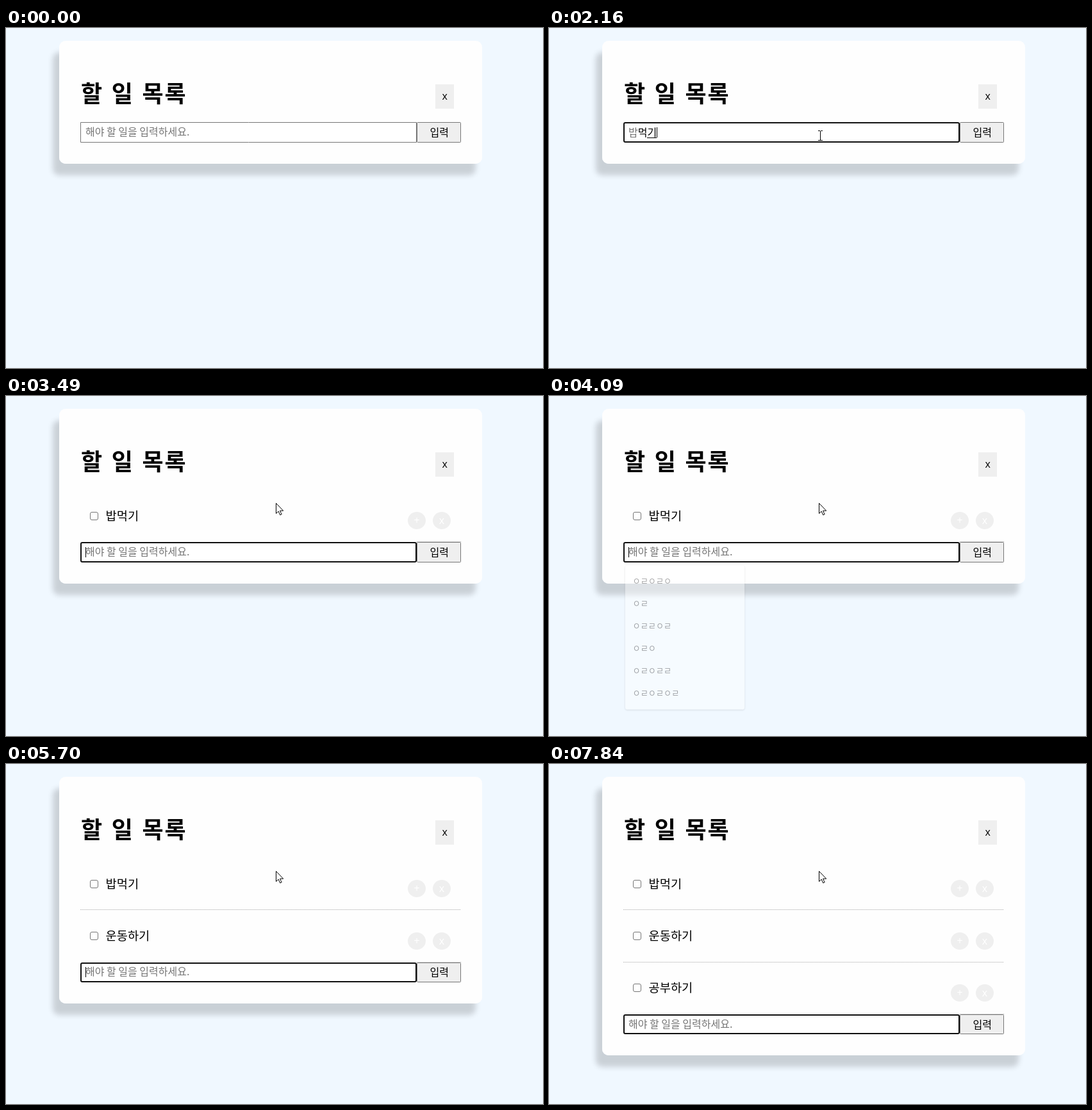
An HTML page with a canvas for the animation above (8 s loop, 838 by 531 pixels).

```html
<!DOCTYPE html>
<html lang="ko">
<head>
<meta charset="utf-8">
<title>할 일 목록</title>
<style>
  html, body { margin: 0; width: 100%; height: 100%; overflow: hidden; background: #f0f8ff; }
  canvas { display: block; }
</style>
</head>
<body>
<canvas id="stage" width="838" height="531" lang="ko"></canvas>
<script>
const ctx = document.getElementById('stage').getContext('2d');
const LOOP = 8000, TICK = 70;
const KO = '"Noto Sans CJK KR", "Noto Sans CJK JP", "Noto Sans CJK", sans-serif';
const LATIN = '"Open Sans", "Noto Sans", sans-serif';
const BODY = `300 16px ${KO}`;
const PLACEHOLDER = '해야 할 일을 입력하세요.';

// Layout by number of finished items
const LAYOUT = [
  { top: 147, h: 32, caret: 155 },
  { top: 228, h: 32, caret: 236 },
  { top: 310, h: 31, caret: 317 },
  { top: 391, h: 31, caret: 399 }
];
const ITEMS = [
  { at: 2420, text: '밥먹기', y: 181, dots: 194.5 },
  { at: 5700, text: '운동하기', y: 262, dots: 276.5 },
  { at: 7290, text: '공부하기', y: 343, dots: 357.5 }
];

// What the field holds from each moment on
const TYPING = [
  [0, ''],
  [1360, 'ㅂ'], [1500, '바'], [1570, '밥'], [1700, '밥ㅁ'], [1830, '밥머'],
  [1960, '밥먹'], [2090, '밥먹ㄱ'], [2160, '밥먹기'], [2420, ''],
  [2950, 'ㅇ'], [3280, ''], [3620, 'ㅇ'], [3950, ''],
  [4420, 'ㅇ'], [4490, '우'], [4630, '운'], [4770, '운ㄷ'], [4840, '운도'],
  [4960, '운동'], [5090, '운동ㅎ'], [5160, '운동하'], [5230, '운동학'],
  [5430, '운동하기'], [5700, ''],
  [5960, 'ㄱ'], [6060, '고'], [6170, '공'], [6270, '공ㅂ'], [6370, '공부'],
  [6480, '공붛'], [6600, '공부하'], [6690, '공부학'], [6820, '공부하기'], [7290, '']
];

const RECENT = ['dfdf', 'ㅇㄹㅇㄹㅇ', 'ㅀㅀ', 'cvvv', 'ㅇㄹ', '496181'];
const MATCHES = ['ㅇㄹㅇㄹㅇ', 'ㅇㄹ', 'ㅇㄹㄹㅇㄹ', 'ㅇㄹㅇ', 'ㅇㄹㅇㄹㄹ', 'ㅇㄹㅇㄹㅇㄹ'];
const POPUPS = [
  { open: 690, close: 1360, list: RECENT },
  { open: 2950, close: 3280, list: MATCHES },
  { open: 3620, close: 3950, list: MATCHES },
  { open: 4420, close: 4490, list: MATCHES }
];

const FOCUS_AT = 550;
const CARET_OFF = [[0, FOCUS_AT], [1150, 1360], [7840, LOOP]];

function text(str, x, y, font, color = '#000') {
  ctx.font = font;
  ctx.fillStyle = color;
  ctx.fillText(str, x, y);
}

function rounded(x, y, w, h, r) {
  ctx.beginPath();
  ctx.roundRect(x, y, w, h, r);
}

function outline(x, y, w, h, r, color, width = 1) {
  rounded(x + width / 2, y + width / 2, w - width, h - width, r);
  ctx.strokeStyle = color;
  ctx.lineWidth = width;
  ctx.stroke();
}

// A box whose shadow stays outside it, so that it can be translucent
function panel(x, y, w, h, r, fill, [color, dx, dy, blur]) {
  ctx.save();
  ctx.beginPath();
  ctx.rect(0, 0, 838, 531);
  ctx.roundRect(x, y, w, h, r);
  ctx.clip('evenodd');
  ctx.shadowColor = color;
  ctx.shadowOffsetX = dx;
  ctx.shadowOffsetY = dy;
  ctx.shadowBlur = blur;
  rounded(x, y, w, h, r);
  ctx.fillStyle = fill;
  ctx.fill();
  ctx.restore();
  rounded(x, y, w, h, r);
  ctx.fillStyle = fill;
  ctx.fill();
}

function drawCard(bottom) {
  panel(83, 20, 660, bottom - 20, 10, '#fefefe', ['rgba(0,0,0,.16)', -10, 18, 8]);

  ctx.letterSpacing = '2px';
  ctx.wordSpacing = '2.4px';
  text('할 일 목록', 117, 115.5, `700 36px ${KO}`);
  ctx.letterSpacing = ctx.wordSpacing = '0px';

  ctx.fillStyle = '#efefef';
  ctx.fillRect(670, 88, 29, 38);
  text('x', 680.5, 112, `16px ${LATIN}`);
}

function drawItem(item, lineX, lineY) {
  rounded(131, item.y, 13, 13, 2.5);
  ctx.fillStyle = '#fff';
  ctx.fill();
  outline(131, item.y, 13, 13, 2.5, '#767676');
  text(item.text, 155.5, item.y + 13, `300 18.72px ${KO}`);

  ctx.textAlign = 'center';
  [[641, '+'], [680, 'x']].forEach(([x, sign]) => {
    ctx.beginPath();
    ctx.ellipse(x, item.dots, 14, 13.5, 0, 0, Math.PI * 2);
    ctx.fillStyle = '#efefef';
    ctx.fill();
    text(sign, x, item.dots + 5.5, `16px ${LATIN}`, '#fff');
  });
  ctx.textAlign = 'left';

  ctx.fillStyle = '#a8a8a8';
  for (let x = lineX; x < 710; x += 2) ctx.fillRect(x, lineY, 1, 1);
}

function drawField(t, { top, h, caret }, typed) {
  ctx.fillStyle = '#fff';
  ctx.fillRect(117, top + 1, 523, h - 2);

  rounded(641, top, 69, h, 1);
  ctx.fillStyle = '#efefef';
  ctx.fill();
  outline(641, top, 69, h, 1, '#767676');
  text('입력', 661.5, caret + 14, BODY);

  if (t < FOCUS_AT) outline(116, top, 525, h, 0, '#767676');
  else outline(116, top, 525, h, 2, '#101010', 2);

  let end = 124;
  if (typed) {
    text(typed, 124, caret + 14, BODY);
    end += ctx.measureText(typed).width;
    const start = 124 + ctx.measureText(typed.slice(0, -1)).width;
    if (t < 2420 && typed.length > 1) {
      ctx.fillStyle = '#fff';
      ctx.fillRect(122, caret - 1, 16, 19);
      text(typed[0], 124, caret + 14, BODY, '#757575');
    }
    ctx.fillStyle = '#000';
    ctx.fillRect(Math.round(start), caret + 16, Math.round(end - start), 1);
  } else {
    text(PLACEHOLDER, 124, caret + 13, BODY, '#757575');
  }

  if (!CARET_OFF.some(([from, to]) => t >= from && t < to)) {
    ctx.fillStyle = '#000';
    ctx.fillRect(Math.floor(end), caret, 1, 16);
  }
}

function drawPopup(t, { top }) {
  const popup = POPUPS.find(p => t >= p.open && t < p.close + 3 * TICK);
  if (!popup) return;
  const step = t < popup.close ? 0 : Math.floor((t - popup.close) / TICK) + 1;
  const scale = 1 - step * 0.01;
  const y = top + 33;

  ctx.save();
  ctx.globalAlpha = 1 - step * 0.2;
  ctx.translate(212, y + 116);
  ctx.scale(scale, scale);
  ctx.translate(-212, -y - 116);
  panel(116, y, 192, 232, 4, '#fff', ['rgba(0,0,0,.3)', 0, 1, 3]);
  popup.list.forEach((row, i) => {
    const latin = /^\w/.test(row);
    text(row, 128, y + 30.5 + i * 36, latin ? `13px ${LATIN}` : `13.6px ${KO}`, '#202124');
  });
  ctx.restore();
}

function drawArrow(x, y) {
  const pts = [[0, 0], [0, 16], [3.7, 12.6], [6.2, 18.3], [8.6, 17.3], [6.1, 11.7], [11.2, 11.7]];
  ctx.beginPath();
  pts.forEach(([dx, dy]) => ctx.lineTo(x + dx + 0.5, y + dy + 0.5));
  ctx.closePath();
  ctx.fillStyle = '#fff';
  ctx.fill();
  ctx.strokeStyle = '#000';
  ctx.lineWidth = 1;
  ctx.stroke();
}

function drawBeam(x, y) {
  ctx.fillStyle = '#000';
  ctx.fillRect(x, y - 7, 1, 15);
  [-8, 7].forEach(dy => {
    ctx.fillRect(x - 3, y + dy, 3, 1);
    ctx.fillRect(x + 1, y + dy, 3, 1);
  });
}

function drawCursor(t) {
  if (t < 70) return;
  if (t >= 2420) return drawArrow(421, 167);
  const p = Math.min(1, Math.floor((t - 70) / TICK) / 6);
  const rest = (1 - p) ** 2;
  const x = Math.round(423 + 380 * rest);
  const y = Math.round(168 + 344 * rest);
  if (y < 179 && x < 641) drawBeam(x, y);
  else drawArrow(x, y);
}

function draw(now) {
  const t = now % LOOP;
  const done = ITEMS.filter(item => t >= item.at);
  const layout = LAYOUT[done.length];
  const typed = TYPING.findLast(([at]) => t >= at)[1];

  ctx.fillStyle = '#f0f8ff';
  ctx.fillRect(0, 0, 838, 531);
  drawCard(layout.top + layout.h + 33);
  done.forEach((item, i) => {
    const last = i === done.length - 1;
    drawItem(item, last ? 641 : 116, LAYOUT[i + 1].top - 1);
  });
  drawField(t, layout, typed);
  drawPopup(t, layout);
  drawCursor(t);
  requestAnimationFrame(draw);
}
requestAnimationFrame(draw);
</script>
</body>
</html>
```
